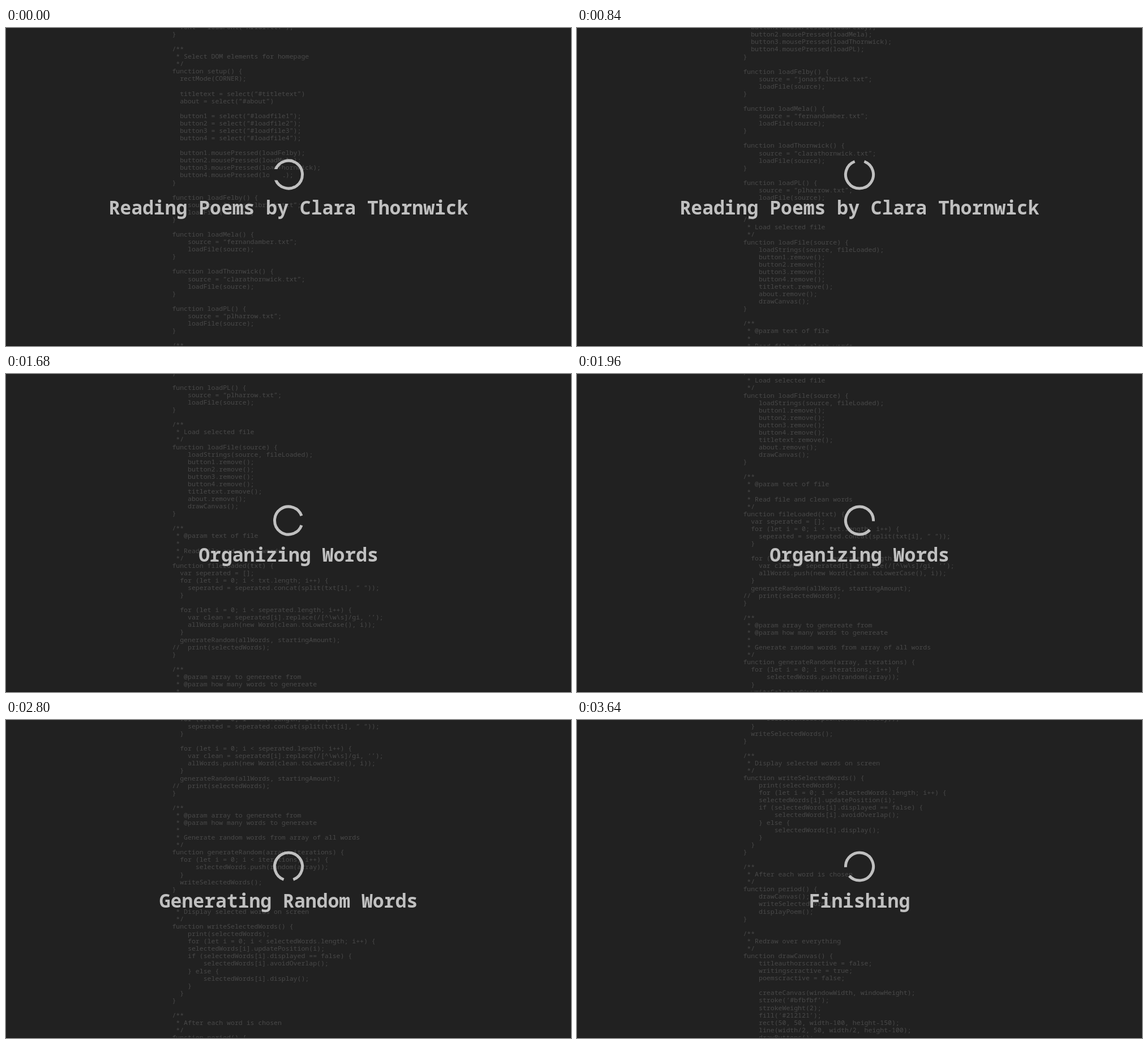
Animation, 998 px wide and 561 px high, one loop 3.92 s. Source, as an HTML page:

```html
<!DOCTYPE html>
<html lang="en">
<head>
<meta charset="utf-8">
<title>Reading poems</title>
<style>
html, body { margin: 0; width: 100%; height: 100%; overflow: hidden; background: #212121; }
#stage {
  position: relative; width: 998px; height: 561px; overflow: hidden;
  background: #212121; font-family: "Noto Sans Mono", "Liberation Mono", monospace;
  animation: tick 3920ms step-end infinite;
}
#code {
  position: absolute; left: 293.4px; top: -9.1px; margin: 0;
  font: 11.53px/13.08px "Noto Sans Mono", "Liberation Mono", monospace;
  font-variant-ligatures: none; color: #494949;
  transform: translateY(calc(var(--row) * -13.08px));
}
svg { position: absolute; inset: 0; }
.ring {
  fill: none; stroke: #c0c0c0; stroke-width: 5;
  transform-origin: 499px 258.5px; transform: rotate(var(--turn));
}
.gap { fill: #212121; opacity: var(--gap); }
text {
  fill: #c0c0c0; font-size: 33.1px; font-weight: 700; text-anchor: middle;
  opacity: 0; animation: 3920ms step-end infinite;
}
.read { animation-name: read; }
.sort { animation-name: sort; }
.pick { animation-name: pick; }
.done { animation-name: done; }

/* whole rows and sixteenths of a turn, one stop every 280 ms */
@keyframes tick {
  0%        { --row: 0;  --turn: 180deg;   --gap: 1; }
  7.14286%  { --row: 6;  --turn: 202.5deg; --gap: 0; }
  14.28571% { --row: 11; --turn: 247.5deg; --gap: 0; }
  21.42857% { --row: 17; --turn: 270deg;   --gap: 0; }
  28.57143% { --row: 23; --turn: 292.5deg; --gap: 0; }
  35.71429% { --row: 30; --turn: 337.5deg; --gap: 0; }
  42.85714% { --row: 36; --turn: 360deg;   --gap: 0; }
  50%       { --row: 43; --turn: 382.5deg; --gap: 0; }
  57.14286% { --row: 50; --turn: 405deg;   --gap: 0; }
  64.28571% { --row: 57; --turn: 427.5deg; --gap: 0; }
  71.42857% { --row: 64; --turn: 450deg;   --gap: 0; }
  78.57143% { --row: 70; --turn: 472.5deg; --gap: 0; }
  85.71429% { --row: 77; --turn: 495deg;   --gap: 0; }
  92.85714%, 100% { --row: 84; --turn: 517.5deg; --gap: 0; }
}
@keyframes read { 0% { opacity: 1; } 28.57143%, 100% { opacity: 0; } }
@keyframes sort { 0% { opacity: 0; } 28.57143% { opacity: 1; } 57.14286%, 100% { opacity: 0; } }
@keyframes pick { 0% { opacity: 0; } 57.14286% { opacity: 1; } 78.57143%, 100% { opacity: 0; } }
@keyframes done { 0% { opacity: 0; } 78.57143%, 100% { opacity: 1; } }
</style>
</head>
<body>
<div id="stage">
<pre id="code">
  font = loadFont(“Arial.ttf”);
}

/**
 * Select DOM elements for homepage
 */
function setup() {
  rectMode(CORNER);

  titletext = select(“#titletext”)
  about = select(“#about”)

  button1 = select(“#loadfile1”);
  button2 = select(“#loadfile2”);
  button3 = select(“#loadfile3”);
  button4 = select(“#loadfile4”);

  button1.mousePressed(loadFelby);
  button2.mousePressed(loadMela);
  button3.mousePressed(loadThornwick);
  button4.mousePressed(loadPL);
}

function loadFelby() {
    source = “jonasfelbrick.txt”;
    loadFile(source);
}

function loadMela() {
    source = “fernandamber.txt”;
    loadFile(source);
}

function loadThornwick() {
    source = “clarathornwick.txt”;
    loadFile(source);
}

function loadPL() {
    source = “plharrow.txt”;
    loadFile(source);
}

/**
 * Load selected file
 */
function loadFile(source) {
    loadStrings(source, fileLoaded);
    button1.remove();
    button2.remove();
    button3.remove();
    button4.remove();
    titletext.remove();
    about.remove();
    drawCanvas();
}

/**
 * @param text of file
 *
 * Read file and clean words
 */
function fileLoaded(txt) {
  var seperated = [];
  for (let i = 0; i &lt; txt.length; i++) {
    seperated = seperated.concat(split(txt[i], “ “));
  }

  for (let i = 0; i &lt; seperated.length; i++) {
    var clean = seperated[i].replace(/[^\w\s]/gi, ‘’);
    allWords.push(new Word(clean.toLowerCase(), i));
  }
  generateRandom(allWords, startingAmount);
//  print(selectedWords);
}

/**
 * @param array to genereate from
 * @param how many words to genereate
 *
 * Generate random words from array of all words
 */
function generateRandom(array, iterations) {
  for (let i = 0; i &lt; iterations; i++) {
      selectedWords.push(random(array));
  }
  writeSelectedWords();
}

/**
 * Display selected words on screen
 */
function writeSelectedWords() {
    print(selectedWords);
    for (let i = 0; i &lt; selectedWords.length; i++) {
    selectedWords[i].updatePosition(i);
    if (selectedWords[i].displayed == false) {
        selectedWords[i].avoidOverlap();
    } else {
        selectedWords[i].display();
    }
  }
}

/**
 * After each word is chosen
 */
function period() {
    drawCanvas();
    writeSelectedWords();
    displayPoem();
}

/**
 * Redraw over everything
 */
function drawCanvas() {
    titleauthorscractive = false;
    writingscractive = true;
    poemscractive = false;

    createCanvas(windowWidth, windowHeight);
    stroke(‘#bfbfbf’);
    strokeWeight(2);
    fill(‘#212121’);
    rect(50, 50, width-100, height-150);
    line(width/2, 50, width/2, height-100);
    drawButtons();
</pre>
<svg width="998" height="561" viewBox="0 0 998 561">
  <!-- open ring, its 40 degree gap facing right -->
  <path class="ring" d="M522.02 266.88A24.5 24.5 0 1 1 522.02 250.12"/>
  <rect class="gap" x="465" y="249" width="25" height="19.5"/>
  <text class="read" x="499" y="329">Reading Poems by Clara Thornwick</text>
  <text class="sort" x="499" y="330.7">Organizing Words</text>
  <text class="pick" x="499" y="330.7">Generating Random Words</text>
  <text class="done" x="499" y="330.7">Finishing</text>
  <rect y="560" width="998" height="1" fill="#191919"/>
</svg>
</div>
</body>
</html>
```
